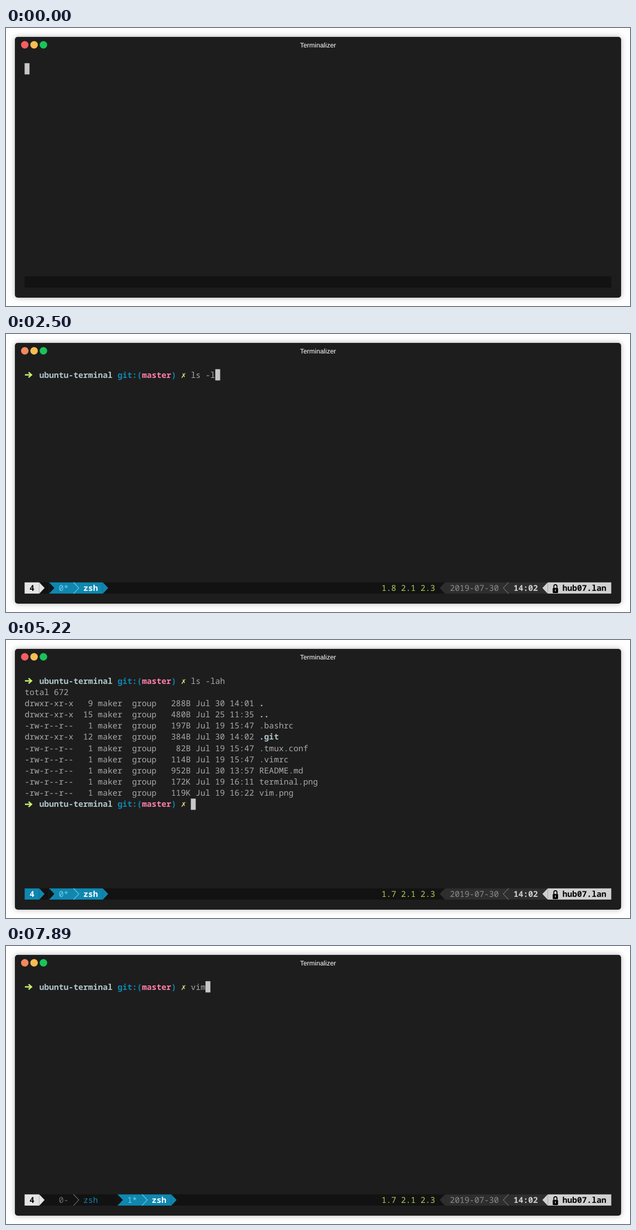
An HTML page for the animation above (8000 ms loop, 1120 px wide and 500 px high).

```html
<!DOCTYPE html>
<html lang="en">
<head>
<meta charset="utf-8">
<title>Terminal</title>
<style>
  html, body { margin: 0; width: 100%; height: 100%; overflow: hidden; background: #fefefe; }
  #window {
    position: absolute; left: 16px; top: 15.5px; width: 1088.3px; height: 469px;
    border-radius: 5px; background: #1d1d1d; box-shadow: 0 0 10px rgba(0, 0, 0, .3);
  }
  svg { position: absolute; left: 0; top: 0; display: block; }
  text {
    font: 14.625px "Noto Sans Mono", "DejaVu Sans Mono", monospace;
    white-space: pre; text-rendering: geometricPrecision;
  }
  .bold { font-weight: 700; }
  .title { font: 12px "Liberation Sans", Arial, sans-serif; }
</style>
</head>
<body>
<div id="window"></div>
<svg width="1120" height="500" viewBox="0 0 1120 500">
  <circle id="close" cx="33.7" cy="30.2" r="6.7"/>
  <circle cx="50.4" cy="30.2" r="6.7" fill="#f8bd50"/>
  <circle cx="67.2" cy="30.2" r="6.7" fill="#18c458"/>
  <text class="title" x="560" y="35" text-anchor="middle" fill="#fff">Terminalizer</text>
  <g id="screen"></g>
  <g id="status"></g>
</svg>
<script>
const LOOP = 8000, LEFT = 33.4, TOP = 63.3, CELL_W = 8.775, CELL_H = 20.18, BAR = 19;
const FG = '#a9a9a9', BLUE = '#0f87af', SKY = '#76cbee', LIGHT = '#e4e4e4',
      GREY = '#d0d0d0', DARK = '#121212', PANEL = '#2e2e2e', RED = '#f55f62', ORANGE = '#f3885f';

const colX = col => LEFT + col * CELL_W;
const rowY = row => TOP + row * CELL_H;

const text = (col, row, str, fill = FG, bold = false) =>
  `<text x="${colX(col)}" y="${rowY(row) + 15.2}" fill="${fill}"${bold ? ' class="bold"' : ''}>${str}</text>`;

const block = (col, row, cols, fill) =>
  `<rect x="${colX(col)}" y="${rowY(row)}" width="${cols * CELL_W}" height="${CELL_H}" fill="${fill}"/>`;

// Powerline separator: dir 1 points right, -1 points left.
function chevron(col, dir, color, thin) {
  const y = rowY(BAR), base = colX(dir > 0 ? col : col + 1), tip = base + dir * 9.6;
  const path = `M${base} ${y}L${tip} ${y + CELL_H / 2}L${base} ${y + CELL_H}`;
  return `<path d="${path}" ` + (thin ? `fill="none" stroke="${color}" stroke-width="1.1"/>` : `fill="${color}"/>`);
}

const cursor = (col, row) => block(col, row, 1, '#c7c7c7');

function prompt(row) {
  const y = rowY(row) + 10.2;
  return `<path d="M34 ${y}H45M40.5 ${y - 4.6}L45.8 ${y}L40.5 ${y + 4.6}" fill="none" stroke="#c8ed71" stroke-width="2.5"/>` +
    text(3, row, 'ubuntu-terminal', '#b1c6ca', true) +
    text(19, row, 'git:(', BLUE, true) +
    text(24, row, 'master', '#ff7fac', true) +
    text(30, row, ')', BLUE, true) +
    text(32, row, '✗', '#ebdf86', true);
}

const FILES = [
  ['d', 9, '288B', 'Jul 30 14:01', '.'],
  ['d', 15, '480B', 'Jul 25 11:35', '..'],
  ['-', 1, '197B', 'Jul 19 15:47', '.bashrc'],
  ['d', 12, '384B', 'Jul 30 14:02', '.git'],
  ['-', 1, '82B', 'Jul 19 15:47', '.tmux.conf'],
  ['-', 1, '114B', 'Jul 19 15:47', '.vimrc'],
  ['-', 1, '952B', 'Jul 30 13:57', 'README.md'],
  ['-', 1, '172K', 'Jul 19 16:11', 'terminal.png'],
  ['-', 1, '119K', 'Jul 19 16:22', 'vim.png']
];

function listing() {
  return text(0, 1, 'total 672') + FILES.map(([type, links, size, date, name], i) => {
    const dir = type === 'd';
    const mode = dir ? 'drwxr-xr-x' : '-rw-r--r--';
    const info = `${mode}  ${String(links).padStart(2)} maker  group  ${size.padStart(5)} ${date}`;
    return text(0, i + 2, info) + text(48, i + 2, name, dir ? '#b1c6ca' : FG, dir);
  }).join('');
}

function drawScreen(s) {
  let out = s.prompt ? prompt(0) + text(34, 0, s.typed) : '';
  if (s.output) out += listing();
  if (s.again) out += prompt(11);
  const row = s.again || s.output ? 11 : s.entered ? 1 : 0;
  const col = s.again ? 34 : s.prompt && !s.entered ? 34 + s.typed.length : 0;
  return out + cursor(col, row);
}

function tab(col, label, active) {
  const shape = active ? block(col, BAR, 11, BLUE) + chevron(col, 1, DARK) + chevron(col + 11, 1, BLUE) : '';
  return shape + text(col + 2, BAR, label, active ? SKY : '#707070') +
    chevron(col + 5, 1, active ? SKY : '#707070', true) +
    text(col + 7, BAR, 'zsh', active ? '#fff' : BLUE, active);
}

function lock() {
  const x = colX(108), y = rowY(BAR);
  return `<path d="M${x + 2.2} ${y + 11}V${y + 7}a2.8 2.8 0 0 1 5.6 0V${y + 11}" fill="none" stroke="#000" stroke-width="1.7"/>` +
    `<rect x="${x + .2}" y="${y + 10}" width="9.6" height="9.2" rx="1.5"/>` +
    `<path d="M${x + 5} ${y + 12.5}v3.6" stroke="${GREY}" stroke-width="1.5"/>`;
}

function drawStatus(s) {
  let out = block(0, BAR, 120, DARK);
  if (!s.status) return out;
  const session = s.prefix ? BLUE : LIGHT;
  out += block(0, BAR, 3, session) + chevron(3, 1, session) + text(1, BAR, '4', s.prefix ? '#fff' : '#000', true);
  out += s.second ? tab(5, '0-', false) + tab(19, '1*', true) : tab(5, '0*', true);
  out += text(73, BAR, s.load + ' 2.1 2.3', '#abd255');
  out += chevron(85, -1, PANEL) + block(86, BAR, 21, PANEL) + text(87, BAR, '2019-07-30', '#8c8c8c');
  out += chevron(98, -1, '#707070', true) + text(100, BAR, '14:02', GREY, true);
  out += chevron(106, -1, GREY) + block(107, BAR, 13, GREY) + lock();
  return out + text(110, BAR, 'hub07.lan', '#000', true);
}

// Each step changes part of the state and keeps the rest.
const STEPS = [
  [0, { typed: '', load: '1.8', dot: RED }],
  [30, { status: true }],
  [930, { prompt: true, dot: ORANGE }],
  [1680, { typed: 'l' }],
  [1770, { typed: 'ls' }],
  [2080, { typed: 'ls ' }],
  [2270, { typed: 'ls -' }],
  [2500, { typed: 'ls -l' }],
  [2700, { typed: 'ls -la' }],
  [2890, { typed: 'ls -lah' }],
  [3250, { entered: true, dot: RED }],
  [3350, { output: true }],
  [3380, { again: true }],
  [4120, { load: '1.7' }],
  [5220, { prefix: true }],
  [5480, { prefix: false, second: true, prompt: false, entered: false, output: false, again: false, typed: '' }],
  [6260, { prompt: true }],
  [7520, { typed: 'v', dot: ORANGE }],
  [7710, { typed: 'vi' }],
  [7890, { typed: 'vim' }]
];
let state = {};
const states = STEPS.map(([at, change]) => (state = { ...state, ...change, at }));

const el = id => document.getElementById(id);
const start = performance.now();
let shown;

function frame() {
  const t = (performance.now() - start) % LOOP;
  const now = states.filter(s => s.at <= t).pop();
  if (now !== shown) {
    shown = now;
    el('close').setAttribute('fill', now.dot);
    el('screen').innerHTML = drawScreen(now);
    el('status').innerHTML = drawStatus(now);
  }
  requestAnimationFrame(frame);
}
frame();
</script>
</body>
</html>
```
